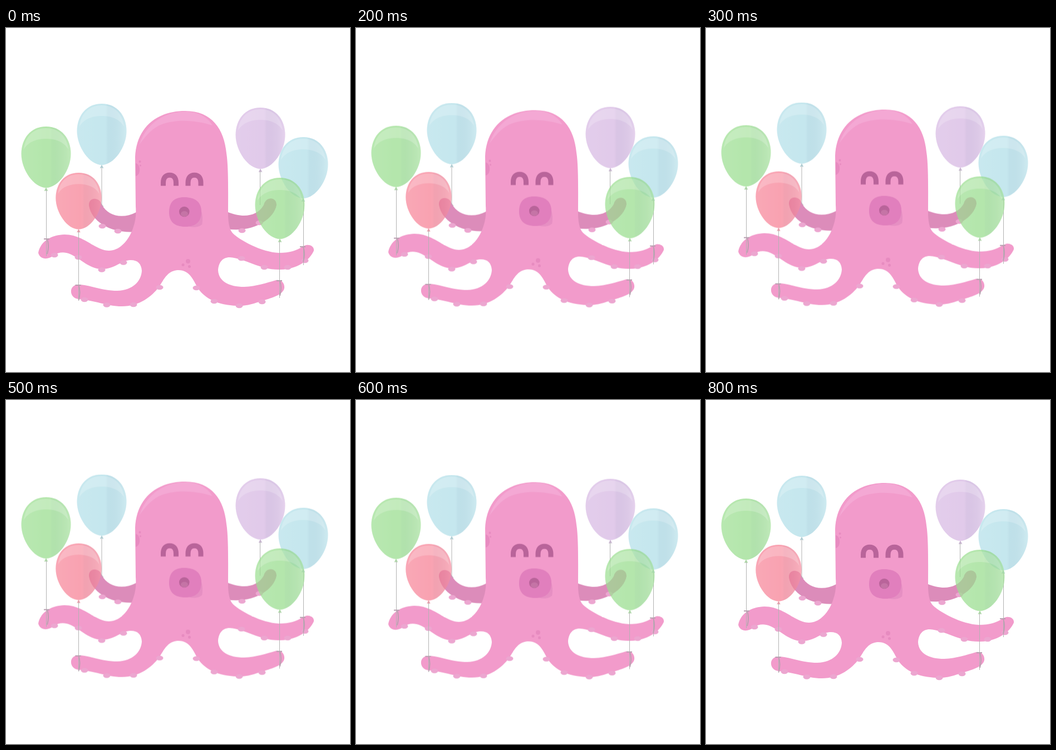
An HTML page that plays this animation: 618 by 618 pixels, repeating every 900 ms.

```html
<!DOCTYPE html>
<html lang="en">
<head>
<meta charset="utf-8">
<title>Octopus with balloons</title>
<style>
  html, body { margin: 0; width: 100%; height: 100%; overflow: hidden; background: #fff; }
  svg { display: block; width: 100%; height: 100%; }

  .scene { animation: bob 900ms step-end infinite; }
  @keyframes bob {
    0%, 88.88% { transform: translateY(0); }
    11.11%, 77.77% { transform: translateY(-.4px); }
    22.22%, 66.66% { transform: translateY(-1.4px); }
    33.33%, 55.55% { transform: translateY(-2.4px); }
    44.44% { transform: translateY(-2.8px); }
  }

  .body { fill: #f29bcb; }
  .back-arm { fill: #dc8cba; }
  .sucker { fill: #eca6d0; }
  .spot { fill: #e78bc0; }
  .eye { fill: none; stroke: #b9649a; stroke-width: 9; }
  .string { fill: none; stroke: #b2b2b2; stroke-width: 1; }
  .tie { fill: none; stroke: #b9a0b0; stroke-width: 1.8; }
  .green { color: #97dd8c; }
  .red { color: #f77f94; }
  .blue { color: #c5e7ee; }
  .purple { color: #e1caea; }
  .sheer { opacity: .72; }
</style>
</head>
<body>
<svg viewBox="0 0 618 618">
  <defs>
    <linearGradient id="shade">
      <stop offset="0" stop-color="#fff" stop-opacity=".06"/>
      <stop offset=".55" stop-color="#fff" stop-opacity="0"/>
      <stop offset=".62" stop-color="#506890" stop-opacity=".05"/>
      <stop offset="1" stop-color="#fff" stop-opacity=".16"/>
    </linearGradient>
    <path id="shell" d="M0 0C28 0 44.5 22 44.5 49C44.5 78 22 110 0 110C-22 110-44.5 78-44.5 49C-44.5 22-28 0 0 0Z"/>
    <g id="balloon">
      <path d="M0 109L-3.5 116Q0 114 3.5 116Z" fill="currentColor"/>
      <path d="M0 110L-3 116H3Z" fill="#777" opacity=".25"/>
      <use href="#shell" fill="currentColor"/>
      <use href="#shell" fill="url(#shade)"/>
      <path d="M-40 41C-37 15-20 3 0 3C20 3 37 15 40 41C32 27 16 22 0 22C-16 22-32 27-40 41Z" fill="#fff" opacity=".2"/>
    </g>
    <path id="eye" d="M282.5 283.5V278C282.5 268.5 287 264.3 294 264.3C301 264.3 305.5 268.5 305.5 278V283.5"/>
    <path id="tie" d="M-5 0H5M1 0C4 9 3 20 1 27"/>
  </defs>

  <g class="scene">
    <g class="back-arm">
      <path d="M149 319C148 303 168 303 172 317C183 338 209 344 234 331V366C192 370 154 350 149 319Z"/>
      <path d="M397 330C425 342 451 339 463 318C467 302 486 303 486 318C481 345 442 368 397 361Z"/>
    </g>

    <path class="body" d="M233 320L232 232C234 181 268 149 322 149C370 149 392 182 396 225C400 250 399 300 399 338C400 355 402 365 411 372C431 388 465 403 490 404C510 404 522 400 534 392C543 387 554 391 553 400C546 417 522 435 490 434C455 434 430 414 402 412C388 412 382 422 381 435C382 455 400 465 428 465C450 464 468 458 485 453C495 451 501 459 500 467C498 479 480 484 461 490C445 495 432 500 415 499C380 498 358 486 345 468C336 452 330 435 310 435C291 435 284 451 275 465C262 482 240 500 208 500C180 500 160 489 130 487C112 484 113 461 130 461C150 461 170 472 200 472C228 471 243 455 244 436C243 422 235 416 222 417C205 419 195 433 172 433C150 433 135 415 115 406C105 402 95 402 85 409C75 417 61 416 58 404C60 389 75 372 105 371C140 371 160 400 185 400C205 400 222 380 229 357C233 345 234 335 233 320Z"/>
    <path d="M240 209C250 176 280 151 322 150C345 150 362 160 371 175C340 165 302 163 275 175C260 183 250 195 240 209Z" fill="#f4a8d4"/>
    <g id="suckers" class="sucker"></g>

    <g class="spot">
      <path d="M233 243C242 244 243 264 233 266Z"/>
      <circle cx="240.5" cy="240" r="2"/>
      <circle cx="241.5" cy="247" r="1.6"/>
      <circle cx="327" cy="419" r="4"/>
      <circle cx="318" cy="425.5" r="2.5"/>
      <circle cx="329.5" cy="428.5" r="2.5"/>
    </g>

    <use href="#eye" class="eye"/>
    <use href="#eye" class="eye" x="44.5"/>

    <path d="M343 314C354 327 354 345 352 353C344 360 331 358 325 355Z" fill="#e68fc3"/>
    <path d="M293 331C293 313 302 304 320 304C340 304 351 313 351 330C351 348 341 357 322 357C303 357 293 348 293 331Z" fill="#e17fbd"/>
    <circle cx="320.3" cy="330" r="9.3" fill="#b9649a"/>
    <ellipse cx="320.5" cy="334" rx="6.5" ry="5" fill="#c574a6"/>

    <g class="string">
      <path d="M172 252V317L175 321"/>
      <path d="M72.5 292V410"/>
      <path d="M130.5 366V490"/>
      <path d="M456.5 258V318"/>
      <path d="M534.5 305V426"/>
      <path d="M491.5 384V485"/>
    </g>
    <g class="tie">
      <use href="#tie" x="73" y="379"/>
      <use href="#tie" x="129.5" y="462"/>
      <use href="#tie" x="533" y="393"/>
      <use href="#tie" x="491" y="454"/>
    </g>

    <use href="#balloon" class="blue" x="172" y="136"/>
    <use href="#balloon" class="green sheer" x="72" y="177"/>
    <use href="#balloon" class="red sheer" transform="translate(130.5 260) scale(.925)"/>
    <use href="#balloon" class="purple" x="457" y="143"/>
    <use href="#balloon" class="blue" x="534" y="196"/>
    <use href="#balloon" class="green sheer" x="492" y="269"/>
  </g>
</svg>
<script>
  const suckers = [
    [87, 408], [130, 412], [172, 434.5], [211, 421.5], [141, 488], [181, 497.5],
    [229, 497], [276, 466], [342, 467], [374, 491], [419, 499], [460, 492],
    [423, 414], [464, 430], [506, 430], [537, 418], [173, 356], [201, 365],
    [424, 364], [455, 350]
  ];
  document.getElementById("suckers").innerHTML = suckers
    .map(([x, y]) => `<ellipse cx="${x}" cy="${y}" rx="6.5" ry="4.2"/>`)
    .join("");
</script>
</body>
</html>
```
